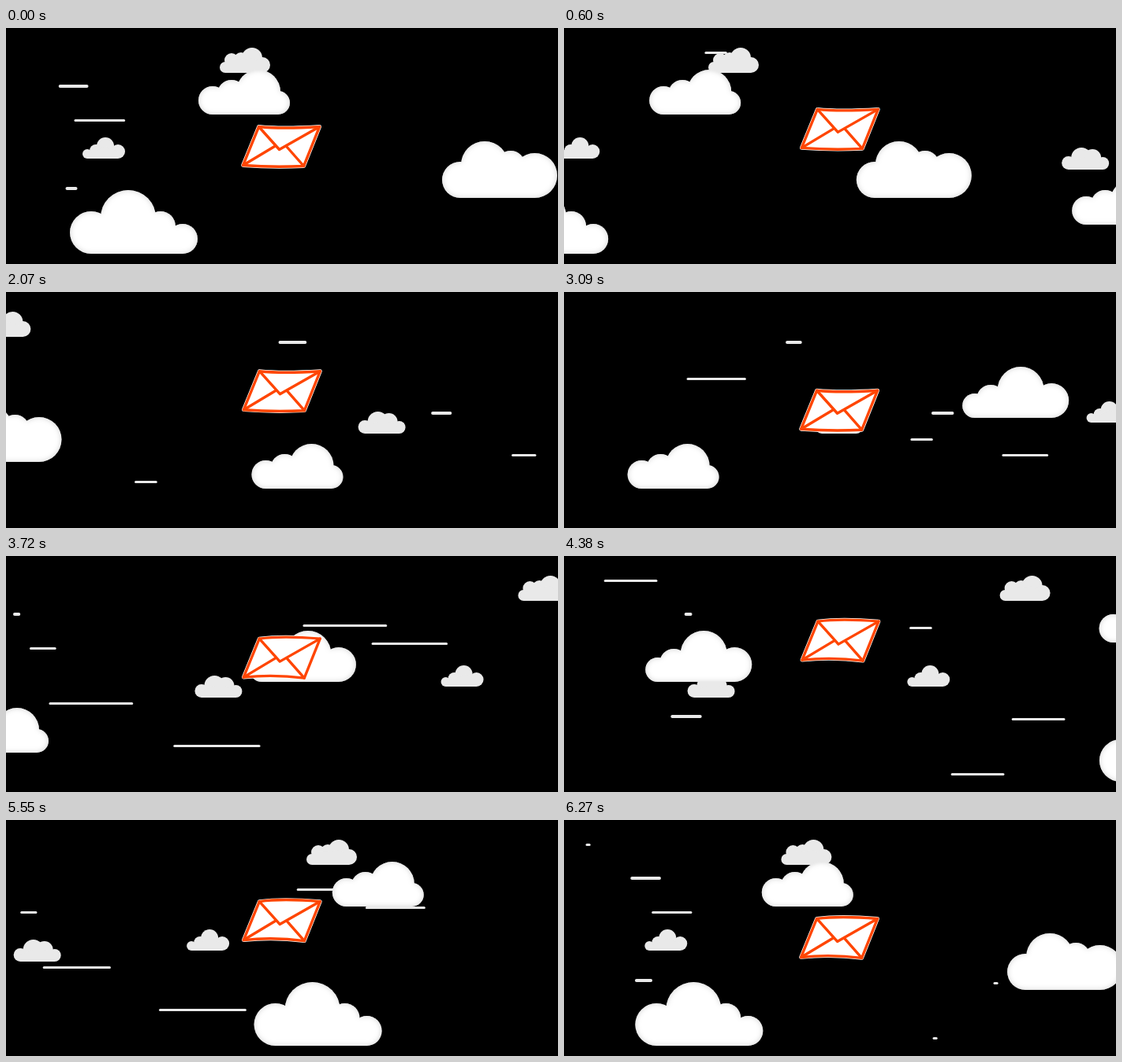
An HTML page that plays this animation: 700x300 px, repeating every 6300 ms.

```html
<!DOCTYPE html>
<html lang="en">
<head>
<meta charset="utf-8">
<title>Flying letter</title>
<style>
  html, body { margin: 0; width: 100%; height: 100%; overflow: hidden; background: #000; }
  svg { display: block; width: 700px; height: 300px; }
</style>
</head>
<body>
<svg viewBox="0 0 700 300" xmlns="http://www.w3.org/2000/svg">
  <defs>
    <filter id="softEdge" x="-5%" y="-5%" width="110%" height="110%" color-interpolation-filters="sRGB">
      <feGaussianBlur in="SourceAlpha" stdDeviation="3.5" result="blur"/>
      <feFlood flood-color="#d2d2d2"/>
      <feComposite operator="out" in2="blur"/>
      <feComposite operator="in" in2="SourceAlpha" result="rim"/>
      <feMerge>
        <feMergeNode in="SourceGraphic"/>
        <feMergeNode in="rim"/>
      </feMerge>
    </filter>
  </defs>
  <g id="streaks" fill="#e9e9e9"></g>
  <g id="clouds"></g>
  <g id="letter" fill="none" stroke-linecap="round" stroke-linejoin="round">
    <path class="sheet" fill="#fff" stroke="#fff" stroke-width="4.8"/>
    <g stroke="#ff4500" stroke-width="3.4">
      <path class="sheet"/>
      <path d="M322 2 L348 31 L399 2 M302 51 L342 27 M379 52 L357 27"/>
    </g>
  </g>
</svg>
<script>
const LOOP = 6300, STEP = 30, FRAMES = LOOP / STEP;
const $ = id => document.getElementById(id);
const mod = (a, n) => ((a % n) + n) % n;

function add(parent, tag, attrs) {
  const node = document.createElementNS("http://www.w3.org/2000/svg", tag);
  for (const key in attrs) node.setAttribute(key, attrs[key]);
  return parent.appendChild(node);
}

// A cloud rests on two end puffs; bumps [cx, top, r] fill the space between.
function cloud(white, width, height, leftR, rightR, bumps) {
  const node = add($("clouds"), "g", white
    ? { fill: "#fff", filter: "url(#softEdge)" }
    : { fill: "#e9e9e9" });
  const puffs = [
    [leftR, height - leftR, leftR],
    ...bumps.map(([cx, top, r]) => [cx, top + r, r]),
    [width - rightR, height - rightR, rightR]
  ];
  for (const [cx, cy, r] of puffs) add(node, "circle", { cx, cy, r });
  const spine = puffs.map(([cx, cy]) => `${cx},${cy}`).join(" ");
  add(node, "polygon", { points: `${leftR},${height} ${spine} ${width - rightR},${height}` });
  return { node, width };
}

const medium = () => cloud(true, 116, 57, 18, 15, [[42, 13, 18], [76, 0, 28]]);

// x at the start, top, distance covered in one loop.
const fly = (shape, x, y, span) => ({ ...shape, x, y, span });
const clouds = [
  fly(cloud(false, 64, 32, 7, 10, [[15, 7, 9], [27, 6, 9], [41, 0, 13]]), 271, 25, 924),
  fly(cloud(false, 54, 27, 6, 9, [[17, 9, 8], [29, 0, 11]]), 97, 139, 1110),
  fly(cloud(false, 60, 28, 8.5, 8, [[25, 0, 13], [39, 2, 11]]), 706.5, 152, 791),
  fly(medium(), 244, 53, 1426),
  fly(medium(), 780, 193, 1426),
  fly(cloud(true, 146, 72, 23, 28.5, [[54, 0, 30], [87, 12, 18]]), 553, 144, 1913),
  fly(cloud(true, 162, 81, 27, 19, [[74, 0, 35], [115, 27, 19]]), 81, 206, 1962),
  fly(cloud(true, 135, 65, 15.5, 22, [[36, 23, 18], [74, 0, 29.5]]), 1468, 95, 1963)
];

// Wind streaks repeat every cycle: they glide left, swell quickly and shrink away.
const CYCLE = 30, SPEED = 18, RISE = 4.4, FALL = 5.6;
const SHORT = 40, MIDDLE = 70, LONG = 115;

// first cycle, full length, y, frame of full length, centre at that frame
function streak(from, length, y, peak, centre) {
  const height = length === SHORT ? 4 : 3;
  const node = add($("streaks"), "rect", { y: y - 2, height, rx: height / 2 });
  return { node, from, length, peak, centre };
}

const streaks = [
  streak(0, SHORT, 74, 29.7, 91),
  streak(0, SHORT, 204, 26.5, 146),
  streak(0, SHORT, 64, 10.3, 340),
  streak(0, MIDDLE, 118, 31.1, 99),
  streak(0, LONG, 32, 23.7, 126),
  streak(0, LONG, 242, 4.8, 253),
  streak(2, SHORT, 154, 11.4, 509),
  streak(2, MIDDLE, 208, 12.1, 601),
  streak(2, LONG, 111, 15.4, 150),
  streak(2, LONG, 188, 16.7, 387),
  streak(4, LONG, 278, 23.7, 566),
  streak(4, LONG, 92, 21.8, 528),
  streak(4, LONG, 208, 23.7, 643),
  streak(4, LONG, 112, 3.1, 528),
  streak(4, LONG, 188, 3.6, 115),
  streak(4, LONG, 89, 3.6, 437)
];

function swell(age) {
  const part = age < 0 ? Math.sin(Math.PI / 2 * Math.max(0, 1 + age / RISE)) : 1 - age / FALL;
  return Math.max(0, part);
}

function drawStreak(s, frame) {
  const age = mod(frame - s.peak + RISE, CYCLE) - RISE;
  const cycle = Math.floor(mod(frame - age, FRAMES) / CYCLE);
  const length = cycle < s.from ? 0 : s.length * swell(age);
  s.node.setAttribute("x", s.centre - SPEED * age - length / 2);
  s.node.setAttribute("width", length);
}

// The letter bobs twice per loop, easing between a few heights.
const BOB = [[0, 123.5], [39, 81], [75, 100], [105, 123.5]];

function bob(frame) {
  const p = frame % 105;
  const i = BOB.findIndex(([at]) => at > p);
  const [t0, y0] = BOB[i - 1], [t1, y1] = BOB[i];
  return y0 + (y1 - y0) * (1 - Math.cos(Math.PI * (p - t0) / (t1 - t0))) / 2;
}

function drawLetter(frame) {
  const y = bob(frame);
  const sag = frame < FRAMES / 2 ? 3 : -4;
  const sheet = `M322 2 Q351 ${2 + sag} 399 2 L379 52 Q340 ${51 + sag} 302 51 Z`;
  for (const path of document.querySelectorAll(".sheet")) path.setAttribute("d", sheet);
  $("letter").setAttribute("transform", `translate(${(81 - y) / 30} ${y})`);
}

function draw(time) {
  const frame = Math.floor(mod(time, LOOP) / STEP);
  for (const c of clouds) {
    const x = mod(c.x - c.span * frame / FRAMES + c.width, c.span) - c.width;
    c.node.setAttribute("transform", `translate(${x} ${c.y})`);
  }
  for (const s of streaks) drawStreak(s, frame);
  drawLetter(frame);
}

const start = performance.now();
function tick() {
  draw(performance.now() - start);
  requestAnimationFrame(tick);
}
tick();
</script>
</body>
</html>
```
